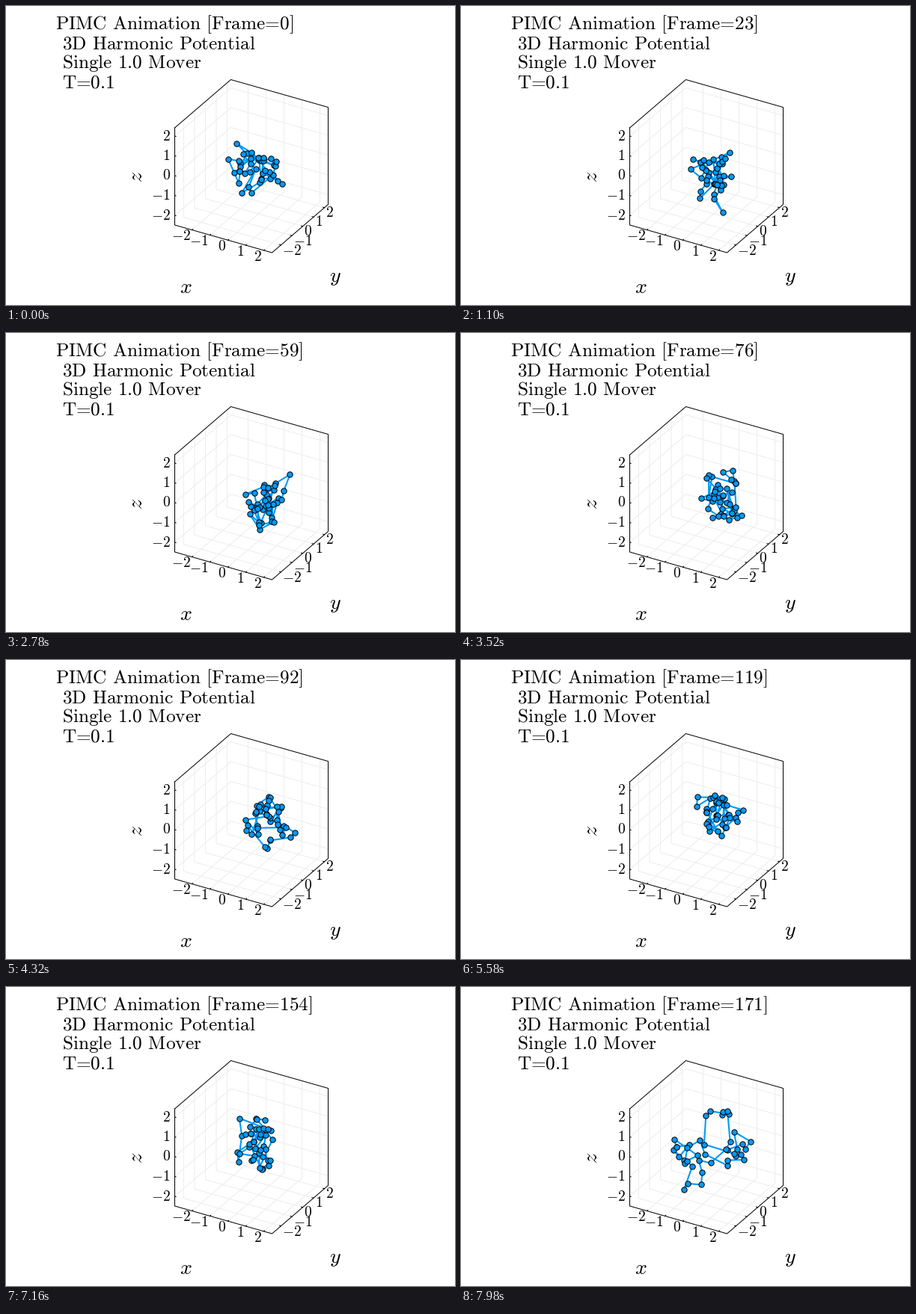
Write a matplotlib script that moves like this. It is 600 px wide and 400 px high and loops after 8000 ms.

```python
import math
import random

import numpy as np
import matplotlib.pyplot as plt
from matplotlib.animation import FuncAnimation

plt.rcParams["mathtext.fontset"] = "cm"

W, H, STEP, LOOP = 600, 400, 20, 8000
BLUE = "#009AFA"
FRAMES = 172

fig = plt.figure(figsize=(W / 100, H / 100), dpi=100, facecolor="white")
ax = fig.add_axes([0, 0, 1, 1])
ax.set_xlim(0, W)
ax.set_ylim(H, 0)
ax.axis("off")


def line(points, color="black", z=2):
    xs, ys = zip(*points)
    ax.plot(xs, ys, color=color, lw=0.72, zorder=z, solid_joinstyle="miter")


def label(x, y, text, size=14, ha="center", va="center", **kw):
    return ax.text(x, y, text, fontsize=size, ha=ha, va=va, **kw)


def roman(text):
    return r"$\text{" + text + "}$"


# The box: front left corner, its three projected edges, pixels per unit
origin = np.array([225.5, 293.0])
edges = np.array([[130.0, 37.0], [75.0, -64.5], [0.0, -130.0]])
unit = np.array([24, 14.5, 26.5]) / [130, 75, 130]
zero = np.array([71, 41, 66]) / [130, 75, 130]


def corner(*fractions):
    return origin + np.array(fractions) @ edges


line([corner(*p) for p in [(0, 0, 1), (0, 1, 1), (1, 1, 1), (1, 1, 0),
                           (1, 0, 0), (0, 0, 0), (0, 0, 1)]])

for v in range(-2, 3):
    a, b, c = zero + v * unit
    for path in ([(a, 0, 0), (a, 1, 0), (a, 1, 1)],
                 [(1, b, 0), (0, b, 0), (0, b, 1)],
                 [(0, 0, c), (0, 1, c), (1, 1, c)]):
        line([corner(*p) for p in path], "#EDEDED", 1)
    line([corner(a, 0, 0), corner(a, 0.015, 0)])
    line([corner(1, b, 0), corner(0.985, b, 0)])
    line([corner(0, 0, c), corner(0.012, 0, c)])
    label(294 + 23.7 * v, 321.8 + 7 * v, f"${v}$", ha="right")
    label(398.3 + 14.5 * v, 301.7 - 12.7 * v, f"${v}$", ha="left")
    label(219.5, 227 - 26.5 * v, f"${v}$", ha="right")

label(240, 376, "$x$", 20)
label(440, 362, "$y$", 20)
label(174, 228, "$z$", 20, rotation=90)

title = label(66, 31.5, "", 18.2, "left", "baseline")
for i, text in enumerate(["3D Harmonic Potential", "Single 1.0 Mover", "T=0.1"]):
    label(74.6, 57.5 + 26 * i, roman(text), 18.2, "left", "baseline")

# Path-integral Monte Carlo of one particle in a harmonic well
BEADS, TAU, REACH = 40, 0.25, 1.0
WARMUP, SWEEPS = 300, 3


def action(r, left, right):
    kinetic = sum((p - q) ** 2 for n in (left, right) for p, q in zip(r, n))
    return kinetic / (2 * TAU) + TAU * sum(p * p for p in r) / 2


def sweep(ring, rng):
    """Offer every bead one move and accept it by the Metropolis rule."""
    for i in range(BEADS):
        left, right = ring[i - 1], ring[(i + 1) % BEADS]
        trial = [p + rng.uniform(-REACH, REACH) for p in ring[i]]
        change = action(trial, left, right) - action(ring[i], left, right)
        if rng.random() < math.exp(-max(change, 0)):
            ring[i] = trial


def make_paths():
    rng = random.Random(11)
    ring = [[0.0] * 3 for _ in range(BEADS)]
    for _ in range(WARMUP):
        sweep(ring, rng)
    axes = edges * unit[:, None]
    paths = []
    for k in range(FRAMES):
        flat = np.array(ring) @ axes
        turn = 2 * math.pi * k / (FRAMES - 1)
        # the ring's centre circles slowly around the well
        centre = 342 - 8 * math.cos(turn), 217 + 13 * math.sin(turn)
        paths.append(flat - flat.mean(axis=0) + centre)
        for _ in range(SWEEPS):
            sweep(ring, rng)
    return paths


paths = make_paths()
chain, = ax.plot([], [], "-o", color=BLUE, lw=1.5, ms=5.3, mec="black",
                 mew=0.72, zorder=3, solid_joinstyle="round")


def frame_at(ms):
    """Pictures last 20, 100 and 20 ms in turn."""
    cycle, rest = divmod(ms, 140)
    return 3 * cycle + (rest >= 20) + (rest >= 120)


def draw(i):
    k = frame_at(i * STEP)
    ring = np.vstack([paths[k], paths[k][:1]])
    chain.set_data(ring[:, 0], ring[:, 1])
    title.set_text(roman(f"PIMC Animation [Frame={k}]"))
    return chain, title


ani = FuncAnimation(fig, draw, frames=LOOP // STEP, interval=STEP,
                    repeat=True, repeat_delay=0, blit=False)
plt.show()
```
